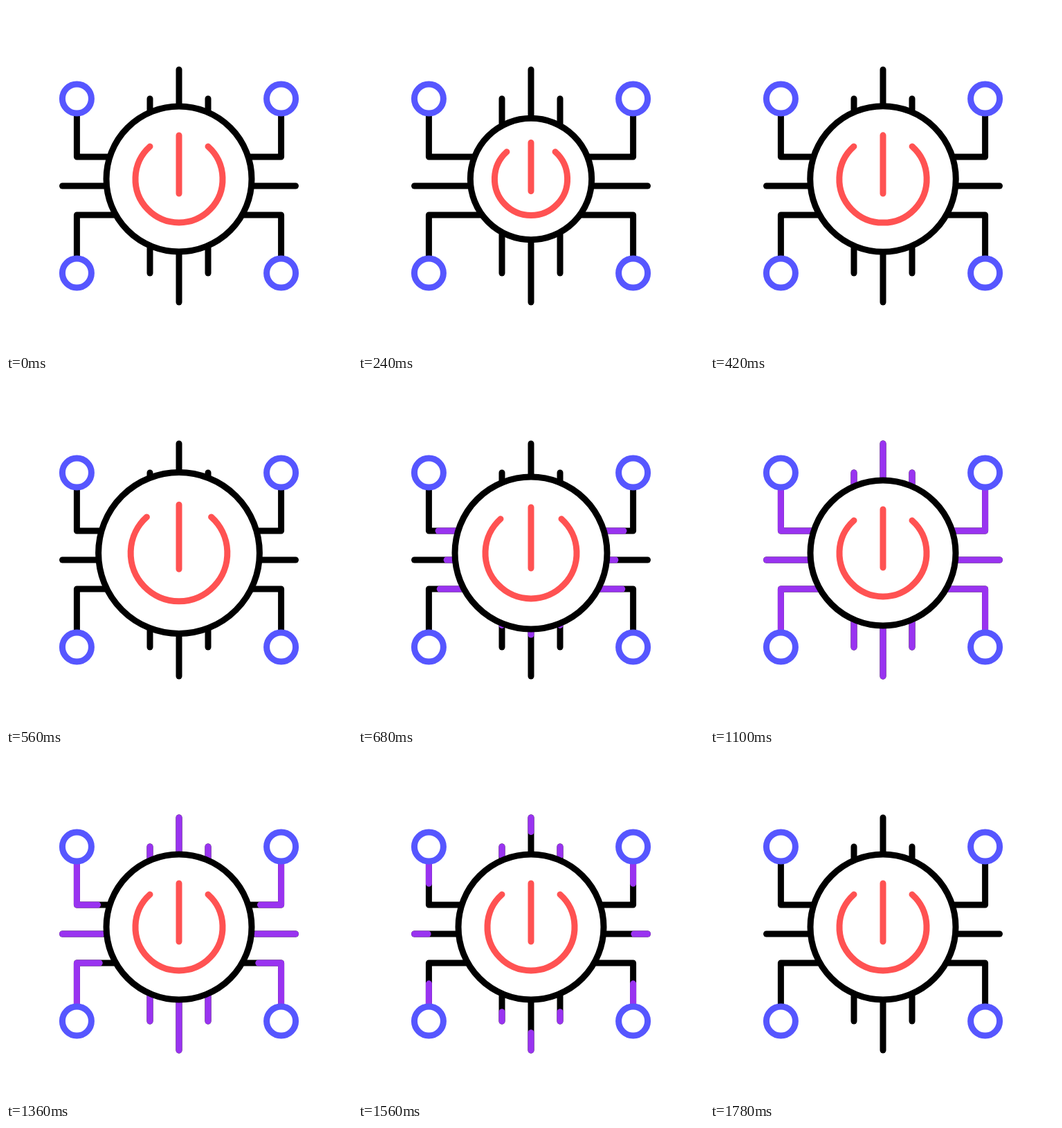
Recreate the animation shown at these times as an HTML page. Size 500 by 500 pixels, loop 2 s.

```html
<!DOCTYPE html>
<html lang="en">
<head>
<meta charset="utf-8">
<title>Power hub</title>
<style>
  html, body { margin: 0; width: 100%; height: 100%; overflow: hidden; background: #fff; }
  svg { display: block; width: 100vw; height: 100vh; }
  svg * { stroke-width: 9; stroke-linecap: round; stroke-linejoin: round; vector-effect: non-scaling-stroke; }
  .wire { fill: none; stroke: #000; }
  .pulse { fill: none; stroke: #9933f0; visibility: hidden; }
  .node { fill: #fff; stroke: #5656ff; }
  .disc { fill: #fff; stroke: #000; }
  .power { fill: none; stroke: #ff5252; }
</style>
</head>
<body>
<svg viewBox="0 0 500 500">
  <g id="wires"></g>
  <g id="pulses"></g>
  <g id="nodes"></g>
  <g id="hub">
    <circle class="disc" r="105"/>
    <path class="power" d="M-42 -47A63 63 0 1 0 42 -47M0 -63V21"/>
  </g>
</svg>
<script>
const LOOP = 2000, STEP = 20;
const $ = id => document.getElementById(id);

function add(parent, tag, attrs) {
  const el = document.createElementNS("http://www.w3.org/2000/svg", tag);
  for (const key in attrs) el.setAttribute(key, attrs[key]);
  parent.append(el);
  return el;
}

// Every wire runs from behind the hub outwards.
const wires = ["M250 182V92", "M250 318V428"];
for (const side of [-1, 1]) {
  const x = dx => 250 + side * dx;
  wires.push(
    `M${x(42)} 192V134`,
    `M${x(42)} 328V386`,
    `M${x(83)} 260H${x(168.5)}`,
    `M${x(70)} 218H${x(147.6)}V155`,
    `M${x(66)} 302H${x(147.6)}V365`
  );
  for (const cy of [134, 386])
    add($("nodes"), "circle", { class: "node", cx: x(147.6), cy, r: 21 });
}

const pulses = wires.map(d => {
  add($("wires"), "path", { class: "wire", d });
  const el = add($("pulses"), "path", { class: "pulse", d });
  return { el, length: el.getTotalLength() };
});

// Steps are [time, value] pairs, eased in and out between neighbours.
const hubScale = [[0, 1], [267, 0.83], [533, 1.112], [800, 1]];
const pulseHead = [[367, 0], [1033, 1]];
const pulseTail = [[1100, 0], [1767, 1]];

function valueAt(steps, t) {
  if (t <= steps[0][0]) return steps[0][1];
  for (let i = 1; i < steps.length; i++) {
    const [t0, a] = steps[i - 1], [t1, b] = steps[i];
    if (t < t1) {
      const p = (t - t0) / (t1 - t0);
      return a + (b - a) * p * p * (3 - 2 * p);
    }
  }
  return steps[steps.length - 1][1];
}

function draw(t) {
  $("hub").setAttribute("transform", `translate(250 250) scale(${valueAt(hubScale, t)})`);
  const head = valueAt(pulseHead, t), tail = valueAt(pulseTail, t);
  for (const { el, length } of pulses) {
    el.style.visibility = head > tail ? "visible" : "hidden";
    el.style.strokeDasharray = `${(head - tail) * length} ${length * 2}`;
    el.style.strokeDashoffset = -tail * length;
  }
}

const start = performance.now();
function tick() {
  const t = (performance.now() - start) % LOOP;
  draw(Math.floor(t / STEP) * STEP);
  requestAnimationFrame(tick);
}
tick();
</script>
</body>
</html>
```
